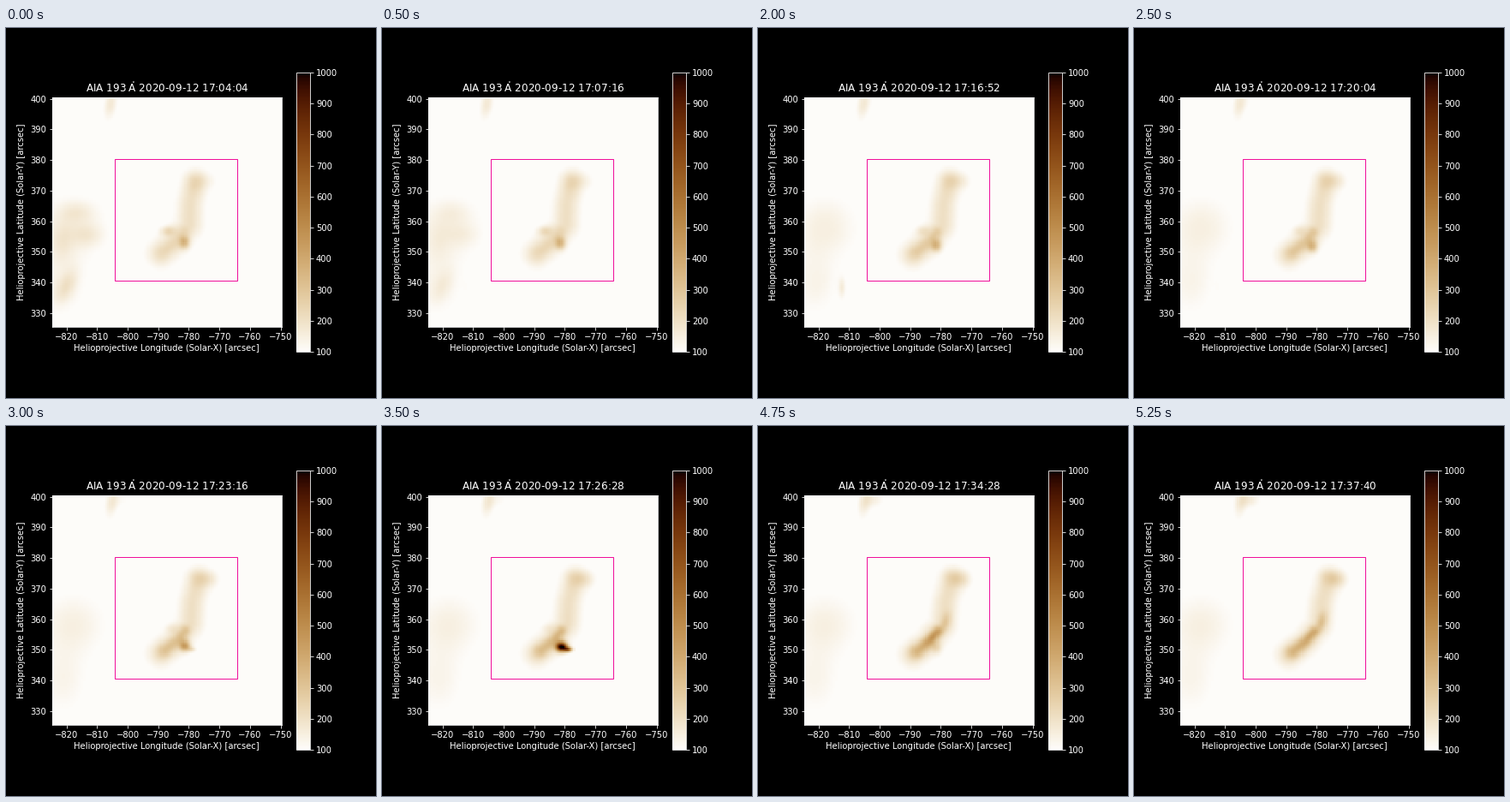
A matplotlib script for the animation above (5500 ms loop, 432 px wide and 432 px high).

```python
import numpy as np
import matplotlib.pyplot as plt
from matplotlib.animation import FuncAnimation
from matplotlib.colors import ListedColormap
from matplotlib.patches import Rectangle

FRAMES, INTERVAL, STAGE = 22, 250, 432
CELLS = 125
QUIET = 84
EXTENT = (-824.65, -749.65, 325.5, 400.5)

# Centre of every image cell, in stage pixels from the top left.
offsets = (np.arange(CELLS) + 0.5) * 267.84 / CELLS
PX, PY = np.meshgrid(54 + offsets, 81.1 + offsets)


def glow(x, y, width, height, tilt=0):
    c, s = np.cos(np.radians(tilt)), np.sin(np.radians(tilt))
    u, v = PX - x, PY - y
    along, across = (u * c + v * s) / width, (v * c - u * s) / height
    return np.exp(-(along**2 + across**2) / 2)


def pulse(n, peak, spread):
    return np.exp(-((n - peak) / spread) ** 2)


def tube(part, start, end, thin, thick):
    """Soft ribbon along the S-shaped loop, which leans right over time."""
    s = np.linspace(start, end, 30)
    bends = [0, 0.3, 0.6, 0.8, 1]
    x = np.interp(s, bends, [221, 215, 214, 199, 181]) + 6 * part * (1 - s)
    y = np.interp(s, bends, [179, 205, 230, 249, 263]) + 4 * part * s
    widths = np.linspace(thin, thick, len(s))
    return np.max([glow(*spot) for spot in zip(x, y, widths, widths)], axis=0)


def loop(n):
    part = n / (FRAMES - 1)
    rising = part * part * (3 - 2 * part)
    return (120 * tube(part, 0, 1, 10, 11)
            + (30 + 130 * rising) * tube(part, 0.68, 0.95, 4, 6)
            + (20 + 60 * part) * glow(238, 179, 8, 7)
            + 40 * glow(221 + 6 * part, 182 - 5 * part, 8, 7)
            + 110 * (1 - part) * glow(189 + 8 * part, 237, 6, 4)
            + 190 * (1 - part**6) * glow(208, 250 + 10 * part, 4, 5)
            + 130 * pulse(n, 18, 3) * glow(203, 246, 9, 4, -45)
            + 120 * pulse(n, 21, 4) * glow(219, 229, 4, 8, 15))


def flare(n):
    return pulse(n, 14, 1.5) * (750 * glow(210, 258, 4.5, 3.5)
                                + 500 * glow(217, 261, 3.5, 2))


def plage(n):
    part, fading = n / (FRAMES - 1), np.exp(-n / 3)
    return (60 * glow(78, 232, 25, 24)
            + 45 * glow(66, 295, 19, 27)
            + fading * (55 * glow(95, 242, 13, 9) + 50 * glow(82, 215, 14, 8)
                        + 50 * glow(65, 250, 9, 16)
                        + 80 * glow(70, 302, 7, 14, 25))
            + 130 * pulse(n, 6, 2.5) * glow(98, 303, 3, 8)
            + 85 * glow(122 + 3 * part, 89, 5, 12, 10)
            + 70 * part**2 * glow(135, 86, 8, 6))


def intensity(n):
    return QUIET + loop(n) + flare(n) + plage(n)


def title(n):
    total = 4 + 96 * n
    return (r"AIA $193 \; \mathrm{\mathring{A}}$ 2020-09-12 "
            f"17:{4 + total // 60:02d}:{total % 60:02d}")


def axis_label(x, y, text, rotation=0):
    fig.text(x / STAGE, 1 - y / STAGE, text, rotation=rotation,
             ha="center", va="center")


t = np.linspace(0.99, 0, 256)
corona = ListedColormap(np.column_stack([np.sqrt(t), t, t**2]))

plt.style.use("dark_background")
plt.rcParams.update({"font.family": "DejaVu Sans", "font.size": 10})
fig, ax = plt.subplots(figsize=(6, 6), dpi=STAGE / 6)
fig.subplots_adjust(left=0.125, right=0.9, bottom=0.125, top=0.88)

image = ax.imshow(intensity(0), cmap=corona, vmin=100, vmax=1000,
                  extent=EXTENT, interpolation="nearest")
fig.colorbar(image, ax=ax, ticks=range(100, 1001, 100))
ax.add_patch(Rectangle((-804.1, 340.6), 40, 39.8, fill=False,
                       ec="#f0109b", lw=1))
ax.set_xticks(range(-820, -749, 10))
ax.set_yticks(range(330, 401, 10))
axis_label(187.5, 374.2, "Helioprojective Longitude (Solar-X) [arcsec]")
axis_label(18, 214.6, "Helioprojective Latitude (Solar-Y) [arcsec]", 90)
heading = ax.set_title(title(0), fontsize=12)


def draw(n):
    image.set_data(intensity(n))
    heading.set_text(title(n))
    return image, heading


animation = FuncAnimation(fig, draw, frames=FRAMES, interval=INTERVAL,
                          repeat=True, repeat_delay=0)
plt.show()
```
